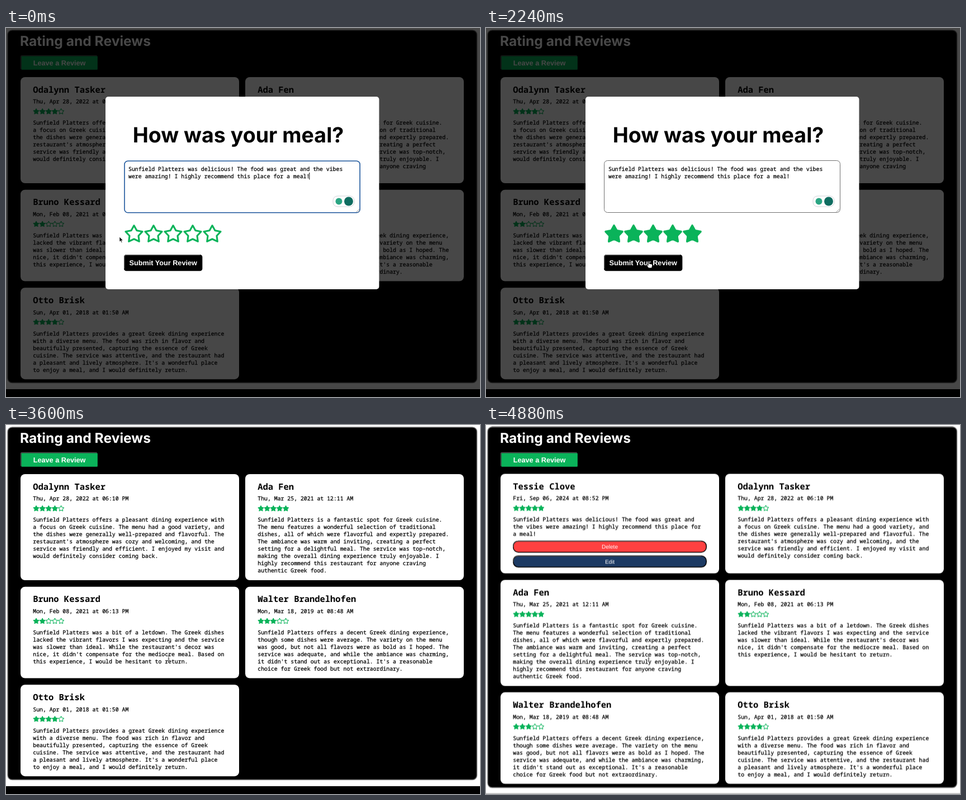
Animation of 848x661 px, one loop 4.96 s. Source, as an HTML page:

```html
<!DOCTYPE html>
<html lang="en">
<head>
<meta charset="utf-8">
<title>Rating and Reviews</title>
<style>
html, body { margin: 0; width: 100%; height: 100%; overflow: hidden; background: #fff; }
svg { display: block; width: 100vw; height: 100vh; text-rendering: geometricPrecision; }
text { white-space: pre; }
.mono { font: 500 9.83px "Noto Sans Mono", "DejaVu Sans Mono", monospace; }
.mono text { stroke: #000; stroke-width: .25px; }
.mono .name { font-size: 15.45px; font-weight: 700; stroke: none; }
.head { font: 700 24.6px Inter, sans-serif; }
.ask { font-size: 37.6px; }
.btn { font: 700 12.7px "Liberation Sans", Arial, sans-serif; fill: #fff; text-anchor: middle; }
.small { font-size: 10px; font-weight: 400; }
.edge { fill: none; stroke: #4c4c4c; stroke-width: 1.5px; }

#old, #new, #modal, #submit .edge, .typed, .hint, .focus, .blur, .caret,
#rated, #rated use, #arrow, #hand, #beam {
  animation: 4.96s step-end infinite both;
}
#old { animation-name: old; }
#new { animation-name: new; }
#modal { animation-name: modal; }
#submit .edge { animation-name: press; }
.typed, #rated { animation-name: typed; }
.hint { animation-name: hint; }
.focus { animation-name: focus; }
.blur { animation-name: blur; }
.caret { animation-name: caret; }
#rated use { animation-name: lit; }
#arrow { animation-name: arrow; }
#hand { animation-name: hand; }
#beam { animation-name: beam; }
#cursor { animation: move 4.96s infinite; }

@keyframes old { 0% { opacity: 1 } 77.41%, to { opacity: 0 } }
@keyframes new {
  0% { opacity: 0; transform: none }
  77.41% { opacity: 1; transform: none }
  79.03%, to { opacity: 1; transform: translateY(-.5px) }
}
@keyframes modal { 0% { opacity: 1 } 56.45%, to { opacity: 0 } }
@keyframes press { 0% { opacity: 1 } 49.99% { opacity: 0 } 53.22%, to { opacity: 1 } }
@keyframes typed { 0% { opacity: 1 } 53.22%, to { opacity: 0 } }
@keyframes hint { 0% { opacity: 0 } 53.22%, to { opacity: 1 } }
@keyframes focus { 0% { opacity: 1 } 22.58%, to { opacity: 0 } }
@keyframes blur { 0% { opacity: 0 } 22.58%, to { opacity: 1 } }
@keyframes caret {
  0% { opacity: 1 } 3.22% { opacity: 0 } 12.9% { opacity: 1 } 22.58%, to { opacity: 0 }
}
/* Each star is delayed; the group hides them all on submit. */
@keyframes lit { 0% { opacity: 1 } 60%, to { opacity: 0 } }
@keyframes arrow {
  0% { opacity: 1 } 1.61% { opacity: 0 } 35.48% { opacity: 1 } 40.32%, to { opacity: 0 }
}
@keyframes hand {
  0% { opacity: 0 } 1.61% { opacity: 1 } 35.48% { opacity: 0 }
  40.32% { opacity: 1 } 54.83%, to { opacity: 0 }
}
@keyframes beam { 0% { opacity: 0 } 54.83%, to { opacity: 1 } }
@keyframes move {
  0% { transform: translate(203px, 374px); animation-timing-function: steps(7) }
  11.29% { transform: translate(362px, 381px); animation-timing-function: step-end }
  32.25% { transform: translate(362px, 381px); animation-timing-function: steps(7) }
  43.54%, to { transform: translate(291px, 417px) }
}
/* Hidden until its delay has passed. */
#rated use { opacity: 0; animation-fill-mode: none; }
</style>
</head>
<body>
<svg viewBox="0 0 848 661" preserveAspectRatio="none">
  <defs>
    <path id="star" stroke="#0ab35a" stroke-width="3.1" stroke-linejoin="round"/>
    <path id="ibeam" d="M-2-5.5Q0-5.5 0-4.5Q0-5.5 2-5.5M0-4.5V5M-2 6Q0 6 0 5Q0 6 2 6M-1.3 2H1.3"/>
  </defs>
  <rect width="848" height="661" fill="#fff"/>
  <g id="old">
    <rect x="3" y="4" width="839.5" height="631.5" rx="8" stroke="#777" stroke-width="1.5"/>
    <rect y="647" width="848" height="14"/>
  </g>
  <g id="new">
    <rect x="3" y="4" width="839.5" height="646" rx="8" stroke="#777" stroke-width="1.5"/>
    <rect y="660" width="848" height="1.5" fill="#aaa"/>
  </g>

  <g id="bar">
    <text class="head" x="25" y="32" fill="#fff">Rating and Reviews</text>
  </g>

  <g id="modal">
    <rect width="848" height="661" opacity=".72"/>
    <rect x="178" y="123" width="489.5" height="345" rx="5" fill="#fff"/>
    <text class="head ask" x="415.5" y="205.3" text-anchor="middle">How was your meal?</text>
    <g fill="none">
      <rect class="focus" x="212" y="238.3" width="421.2" height="92.4" rx="6" stroke="#1d569c" stroke-width="1.6"/>
      <rect class="blur" x="211.5" y="237.5" width="422" height="93" rx="6" stroke="#707070"/>
      <path d="M626.5 330L632.5 324M630 330L632.5 327.5" stroke="#777" stroke-width=".8"/>
    </g>
    <g class="typed mono">
      <text x="219" y="255.5">Sunfield Platters was delicious! The food was great and the vibes</text>
      <text x="219" y="268.5">were amazing! I highly recommend this place for a meal!</text>
    </g>
    <text class="hint mono" x="219" y="255.5" fill="#757575">Leave your review here...</text>
    <rect class="caret" x="542.3" y="259" width="1" height="12.5"/>
    <rect x="585" y="301" width="38" height="19" rx="8" fill="#fff" stroke="#d0d3d8"/>
    <circle cx="595.5" cy="310.5" r="6" fill="#2ba583"/>
    <circle cx="613" cy="310.5" r="8" fill="#0f6c60"/>
    <g id="rating" fill="none"></g>
    <g id="rated" fill="#0ab35a"></g>
    <g id="submit"></g>
  </g>

  <g id="cursor">
    <path id="arrow" d="M0 0V9L2 7.2 3.6 10.6 5 10 3.5 6.7H6.3Z" stroke="#fff" stroke-width=".7"/>
    <path id="hand" d="M-1 1Q0-.6 1 1V5L5.5 6Q7 6.5 6.6 8.5L5.6 13H-.2L-3.4 8.4Q-3.6 7-2.4 7.2L-1 8.4Z"
      fill="#fff" stroke="#000" stroke-width=".9"/>
    <g id="beam" fill="none">
      <use href="#ibeam" stroke="#fff" stroke-width="1.8" opacity=".6"/>
      <use href="#ibeam" stroke="#222" stroke-width=".8"/>
    </g>
  </g>
</svg>
<script>
const reviews = [
  ["Tessie Clove", "Fri, Sep 06, 2024 at 08:52 PM", 5,
    `Sunfield Platters was delicious! The food was great and
the vibes were amazing! I highly recommend this place for
a meal!`],
  ["Odalynn Tasker", "Thu, Apr 28, 2022 at 06:10 PM", 4,
    `Sunfield Platters offers a pleasant dining experience with
a focus on Greek cuisine. The menu had a good variety, and
the dishes were generally well-prepared and flavorful. The
restaurant's atmosphere was cozy and welcoming, and the
service was friendly and efficient. I enjoyed my visit and
would definitely consider coming back.`],
  ["Ada Fen", "Thu, Mar 25, 2021 at 12:11 AM", 5,
    `Sunfield Platters is a fantastic spot for Greek cuisine.
The menu features a wonderful selection of traditional
dishes, all of which were flavorful and expertly prepared.
The ambiance was warm and inviting, creating a perfect
setting for a delightful meal. The service was top-notch,
making the overall dining experience truly enjoyable. I
highly recommend this restaurant for anyone craving
authentic Greek food.`],
  ["Bruno Kessard", "Mon, Feb 08, 2021 at 06:13 PM", 2,
    `Sunfield Platters was a bit of a letdown. The Greek dishes
lacked the vibrant flavors I was expecting and the service
was slower than ideal. While the restaurant's decor was
nice, it didn't compensate for the mediocre meal. Based on
this experience, I would be hesitant to return.`],
  ["Walter Brandelhofen", "Mon, Mar 18, 2019 at 08:48 AM", 3,
    `Sunfield Platters offers a decent Greek dining experience,
though some dishes were average. The variety on the menu
was good, but not all flavors were as bold as I hoped. The
service was adequate, and while the ambiance was charming,
it didn't stand out as exceptional. It's a reasonable
choice for Greek food but not extraordinary.`],
  ["Otto Brisk", "Sun, Apr 01, 2018 at 01:50 AM", 4,
    `Sunfield Platters provides a great Greek dining experience
with a diverse menu. The food was rich in flavor and
beautifully presented, capturing the essence of Greek
cuisine. The service was attentive, and the restaurant had
a pleasant and lively atmosphere. It's a wonderful place
to enjoy a meal, and I would definitely return.`],
];

const $ = id => document.getElementById(id);
const add = (id, html) => $(id).insertAdjacentHTML("beforeend", html);
const five = fn => [0, 1, 2, 3, 4].map(fn).join("");

const points = Array.from({ length: 10 }, (_, i) => {
  const r = i % 2 ? 8.4 : 15.8, a = i * Math.PI / 5;
  return `${(r * Math.sin(a)).toFixed(2)} ${(-r * Math.cos(a)).toFixed(2)}`;
});
$("star").setAttribute("d", `M${points.join("L")}Z`);

function card([name, date, score, body], x, y, h) {
  const left = x + 22.3;
  const stars = five(i => `<use href="#star" fill="${i < score ? "#0ab35a" : "none"}"
    transform="translate(${x + 28 + i * 11.15} ${y + 61.7}) scale(.33)"/>`);
  const lines = body.split("\n").map((line, i) =>
    `<text x="${left}" y="${y + 85.4 + i * 13}">${line}</text>`).join("");
  return `<g class="mono"><rect x="${x}" y="${y}" width="391" height="${h}" rx="8" fill="#fff"/>
    <text class="name" x="${left}" y="${y + 27.5}">${name}</text>
    <text x="${left}" y="${y + 47.4}">${date}</text>${stars}${lines}</g>`;
}

function grid(id, items, rows) {
  add(id, items.map((r, i) => card(r, i % 2 ? 428 : 26, ...rows[i >> 1])).join(""));
}

// Outset border: black all round, grey along the top and left.
function button(id, label, fill, x, y, w, h, r, size = "") {
  add(id, `<rect x="${x}" y="${y}" width="${w}" height="${h}" rx="${r}" fill="${fill}" stroke="#000" stroke-width="1.5"/>
    <path class="edge" d="M${x} ${y + h - r}v${2 * r - h}q0 ${-r} ${r} ${-r}h${w - 2 * r}"/>
    <text class="btn ${size}" x="${x + w / 2}" y="${y + h / 2 + (size ? 3.5 : 4.4)}">${label}</text>`);
}

grid("old", reviews.slice(1), [[88, 190], [289.7, 163.8], [465.2, 164]]);
grid("new", reviews, [[88, 178.3], [278, 190], [479.3, 164]]);
button("new", "Delete", "#ff4141", 48.8, 208.4, 345.4, 20, 9, "small");
button("new", "Edit", "#1c3a63", 48.8, 235, 345.4, 20, 9, "small");
button("bar", "Leave a Review", "#0ab35a", 26.6, 49.6, 138, 26, 2);
button("submit", "Submit Your Review", "#000", 211.8, 406.8, 138.8, 27.6, 3.5);

const litAt = [80, 160, 320, 400, 560];
const place = i => `href="#star" transform="translate(${229 + i * 35} 369.6)"`;
add("rating", five(i => `<use ${place(i)}/>`));
add("rated", five(i => `<use ${place(i)} style="animation-delay:${litAt[i]}ms"/>`));
</script>
</body>
</html>
```
